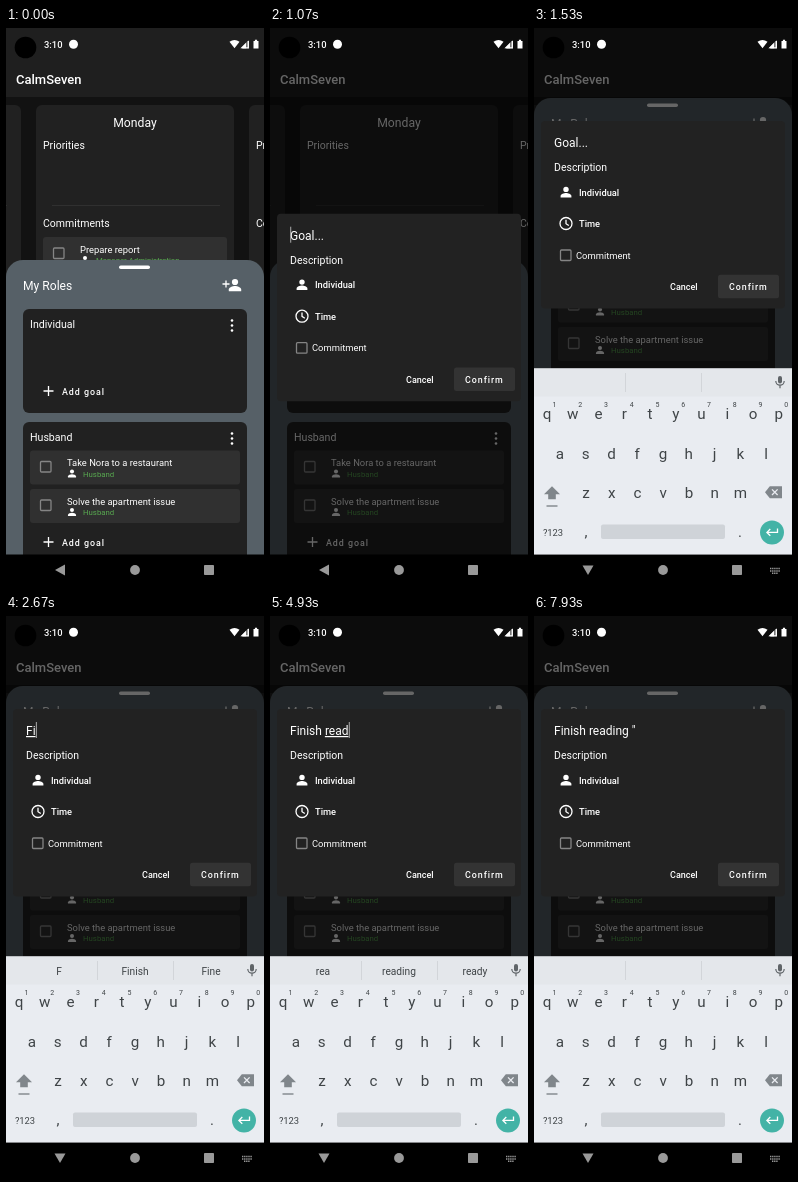
An HTML page that plays this animation: 258x560 px, repeating every 8 s.

```html
<!DOCTYPE html>
<html lang="en">
<head>
<meta charset="utf-8">
<title>Weekly planner</title>
<style>
  html, body { margin: 0; width: 100%; height: 100%; overflow: hidden; background: #000; }
  svg { display: block; width: 258px; height: 560px; }
  text { font-family: Roboto, sans-serif; fill: #fff; white-space: pre; }
  .mid { text-anchor: middle; }
  .strong { font-weight: 500; }
  .spaced { font-weight: 500; letter-spacing: .95px; }
  .green { fill: #58a850; }
  .key { fill: #3f4447; text-anchor: middle; }
  .line { fill: none; stroke: #fff; stroke-width: 1.3; }
  .composing { text-decoration: underline; }
</style>
</head>
<body>
<svg id="stage" viewBox="0 0 258 560"></svg>
<script>
const LOOP = 8000, BLINK = 460;
const KEYBOARD_TOP = 340.5, NAV_TOP = 526.5;
const GOAL = 'Finish reading "';
const KEY_TIMES = [2400, 2600, 2870, 3000, 3130, 3270, 3400,
  4400, 4530, 4730, 4930, 5130, 5330, 5530, 5870, 7130];

// y is the middle of the capital letters
const text = (x, y, size, str, cls = '') =>
  `<text x="${x}" y="${y + size * .36}" font-size="${size}" class="${cls}">${str}</text>`;
const rect = (x, y, w, h, fill, r = 0) =>
  `<rect x="${x}" y="${y}" width="${w}" height="${h}" rx="${r}" fill="${fill}"/>`;
const circle = (x, y, r, fill) => `<circle cx="${x}" cy="${y}" r="${r}" fill="${fill}"/>`;
const path = (d, fill = '#fff') => `<path d="${d}" fill="${fill}"/>`;
const line = d => `<path d="${d}" class="line"/>`;
const group = (id, body) => `<g id="${id}">${body}</g>`;
const checkbox = (x, y) =>
  `<rect x="${x}" y="${y}" width="10.5" height="10.5" rx="1" fill="none" stroke="#858585" stroke-width="1.3"/>`;
const person = (x, y, scale) => `<g transform="translate(${x} ${y}) scale(${scale})">
  ${circle(0, -2.6, 2.7, '#fff')}${path('M-5.4 5.4V4C-5.4 1.9-2 .9 0 .9S5.4 1.9 5.4 4V5.4Z')}</g>`;

const column = (x, day) => rect(x, 77, 198, 460, '#212121', 6)
  + text(x + 99, 95, 12.2, day, 'mid')
  + text(x + 7, 117, 10.5, 'Priorities')
  + rect(x + 16, 177, 168, .8, '#343434')
  + text(x + 7, 195, 10.5, 'Commitments');

const goalItem = (x, y, w, title, role) => rect(x, y, w, 34, '#303030', 3)
  + checkbox(x + 10.5, y + 11)
  + text(x + 37, y + 12.3, 9.4, title)
  + person(x + 42, y + 23, .75)
  + text(x + 53, y + 23.5, 7.8, role, 'green');

const roleCard = (y, h, name) => rect(17, y, 224, h, '#212121', 6)
  + text(24, y + 14.8, 10.6, name)
  + [11.5, 16.5, 21.5].map(d => circle(226, y + d, 1.3, '#fff')).join('');

const addGoal = y => line(`M37.5 ${y}h10M42.5 ${y - 5}v10`) + text(56, y + .3, 8.9, 'Add goal', 'spaced');

const screen = rect(0, 0, 258, 560, '#121212') + rect(0, 0, 258, 69, '#1f1f1f')
  + text(10, 51.5, 13, 'CalmSeven', 'strong')
  + column(-183, 'Sunday') + column(30, 'Monday') + column(243, 'Tuesday')
  + goalItem(37, 209, 184, 'Prepare report', 'Manager Administration');

const sheet = rect(0, 232, 258, 500, '#566067', 17)
  + rect(113, 237.5, 31, 3.5, '#fff', 1.75)
  + text(17, 257.5, 12.1, 'My Roles')
  + person(229, 257, 1.15) + line('M216.5 256h7M220 252.5v7')
  + roleCard(281, 104, 'Individual') + addGoal(363)
  + roleCard(394, 140, 'Husband')
  + goalItem(24, 422.5, 210, 'Take Nora to a restaurant', 'Husband')
  + goalItem(24, 461, 210, 'Solve the apartment issue', 'Husband')
  + addGoal(514);

const dialog = rect(7, 0, 244, 187.5, '#222', 4)
  + `<text x="20" y="26" font-size="12"><tspan id="done"></tspan><tspan id="word" class="composing"></tspan></text>`
  + `<rect id="caret" y="13" width=".9" height="16" fill="#bbb"/>`
  + text(20, 46.3, 10.5, 'Description')
  + person(32, 71, 1) + text(45, 71.3, 9.3, 'Individual', 'strong')
  + `<circle cx="32" cy="102.5" r="6" class="line"/>` + line('M32 98.7v4l2.8 1.8')
  + text(45, 102.8, 9.3, 'Time', 'strong')
  + checkbox(26.5, 129) + text(42, 134.3, 9.4, 'Commitment')
  + text(136, 165.7, 9, 'Cancel', 'strong')
  + rect(184, 153.7, 61, 23.5, '#333', 2.5) + text(195, 165.7, 8.9, 'Confirm', 'spaced');

const keyRow = (letters, x, y) => [...letters].map((c, i) =>
  `<text x="${x + i * 25.75}" y="${y}" font-size="15.2" class="key">${c}</text>`).join('');
const digits = [...'1234567890'].map((c, i) => text(20.5 + i * 25.75, 376.1, 7, c, 'key')).join('');

const keyboard = rect(0, KEYBOARD_TOP, 258, NAV_TOP - KEYBOARD_TOP, '#e9ecf1')
  + rect(0, KEYBOARD_TOP, 258, 28, '#e4e7eb')
  + rect(91, 345, .8, 19, '#cdd1d5') + rect(167, 345, .8, 19, '#cdd1d5')
  + [53, 129, 205].map((x, i) => `<text id="hint${i}" x="${x}" y="358.5" font-size="10.2" class="key"></text>`).join('')
  + rect(244, 348, 4, 7.5, '#5f6468', 2)
  + `<path d="M241.8 353a4.2 4.2 0 0 0 8.4 0M246 357v3.3" fill="none" stroke="#5f6468" stroke-width="1.2"/>`
  + digits
  + keyRow('qwertyuiop', 13, 391.3) + keyRow('asdfghjkl', 26, 430.7) + keyRow('zxcvbnm', 52, 469.8)
  + path('M18 458.2l8 8h-4.2v5h-7.6v-5H10Z', '#80868b') + rect(12.5, 477.3, 11, 1.4, '#80868b')
  + path('M231 464.2l4.8-6H248v12H235.8Z', '#80868b')
  + `<path d="M238 461.4l5.6 5.6m0-5.6l-5.6 5.6" stroke="#e9ecf1" stroke-width="1.3"/>`
  + text(19, 504.3, 9.4, '?123', 'key') + text(52, 503.8, 15, ',', 'key') + text(206, 503.8, 15, '.', 'key')
  + rect(67, 496.5, 124, 14.5, '#cfd3d8', 2)
  + circle(238, 504.4, 12, '#43b3a6') + line('M243.5 500.4v4h-10.5M236.3 501l-3.4 3.4 3.4 3.4');

const navIcons = group('back', path('M59 536.5v11L49 542Z'))
  + group('hide', path('M48.5 537.5h11L54 547Z'))
  + circle(129, 542, 4.9, '#fff') + rect(198, 537, 10, 10, '#fff', .8)
  + `<path id="switcher" d="M236 540.5h10M236 543h10M238 545.3h6" stroke="#fff" stroke-width="1.4" stroke-dasharray="1.4 .7"/>`;

const statusBar = circle(19.5, 19.5, 10.8, '#000')
  + text(38, 16.5, 9.4, '3:10', 'strong') + circle(67.5, 16.3, 4.5, '#fff')
  + path('M223.5 13.8Q228.5 10.2 233.5 13.8L228.5 20.3Z')
  + path('M242.8 12v8.3h-8.3Z', '#777') + path('M240 14.8v5.5h-5.5Z') + line('M242.3 13v6.8h-6')
  + path('M247.5 13h1.4v-1.2h2.2V13h1.4v7.5h-5Z');

document.getElementById('stage').innerHTML = group('screen', screen) + group('sheet', sheet)
  + group('resized', rect(0, KEYBOARD_TOP, 258, NAV_TOP - KEYBOARD_TOP, '#fff'))
  + rect(0, NAV_TOP, 258, 560 - NAV_TOP, '#000')
  + group('dim', rect(0, 0, 258, 560, '#000'))
  + group('dialog', dialog) + group('keyboard', keyboard)
  + `<g opacity=".6">${navIcons}</g>` + statusBar;

const $ = id => document.getElementById(id);
const move = (id, y) => $(id).setAttribute('transform', `translate(0 ${y})`);
const show = (id, on) => $(id).setAttribute('visibility', on ? 'visible' : 'hidden');
const progress = (t, start, span) => Math.min(1, Math.max(0, (t - start) / span));
const easeOut = p => 1 - (1 - p) ** 2;
const typedCount = t => KEY_TIMES.filter(k => k <= t).length;
const currentWord = str => (str.match(/[a-z]+$/i) || [''])[0];

function draw(t) {
  // Dialog fades in over the dimmed screen
  const open = t < 70 ? 0 : progress(t, 10, 190);
  $('dim').setAttribute('opacity', .6 * open);
  $('dialog').setAttribute('opacity', open);

  // Keyboard slides up, the window shrinks, the dialog recentres
  const rise = progress(t, 1080, 180), settled = rise === 1, resized = t >= 1130;
  move('keyboard', (560 - KEYBOARD_TOP) * (1 - easeOut(rise)));
  move('dialog', 185.7 - 92.7 * easeOut(progress(t, 1130, 250)));
  move('sheet', resized ? -162 : 0);
  show('resized', resized);
  show('keyboard', rise > 0);
  show('back', !settled);
  show('hide', settled);
  show('switcher', settled);

  // Typing, with the unfinished word underlined
  const count = typedCount(t), typed = GOAL.slice(0, count), word = currentWord(typed);
  $('done').textContent = count ? typed.slice(0, count - word.length) : 'Goal...';
  $('word').textContent = word;
  const lastKey = count ? KEY_TIMES[count - 1] : 1070;
  show('caret', t >= 1070 && Math.floor((t - lastKey) / BLINK) % 2 === 0);
  const width = count ? $('done').parentNode.getComputedTextLength() : 0;
  $('caret').setAttribute('x', 20.3 + width);

  // Suggestions follow the typing a moment later
  const lagging = currentWord(GOAL.slice(0, typedCount(t - 200)));
  const hints = !lagging ? ['', '', ''] : lagging[0] === 'F'
    ? [lagging, 'Finish', 'Fine'] : [lagging, 'reading', 'ready'];
  hints.forEach((hint, i) => $('hint' + i).textContent = hint);
}

const start = performance.now();
function tick() {
  draw((performance.now() - start) % LOOP);
  requestAnimationFrame(tick);
}
tick();
</script>
</body>
</html>
```
